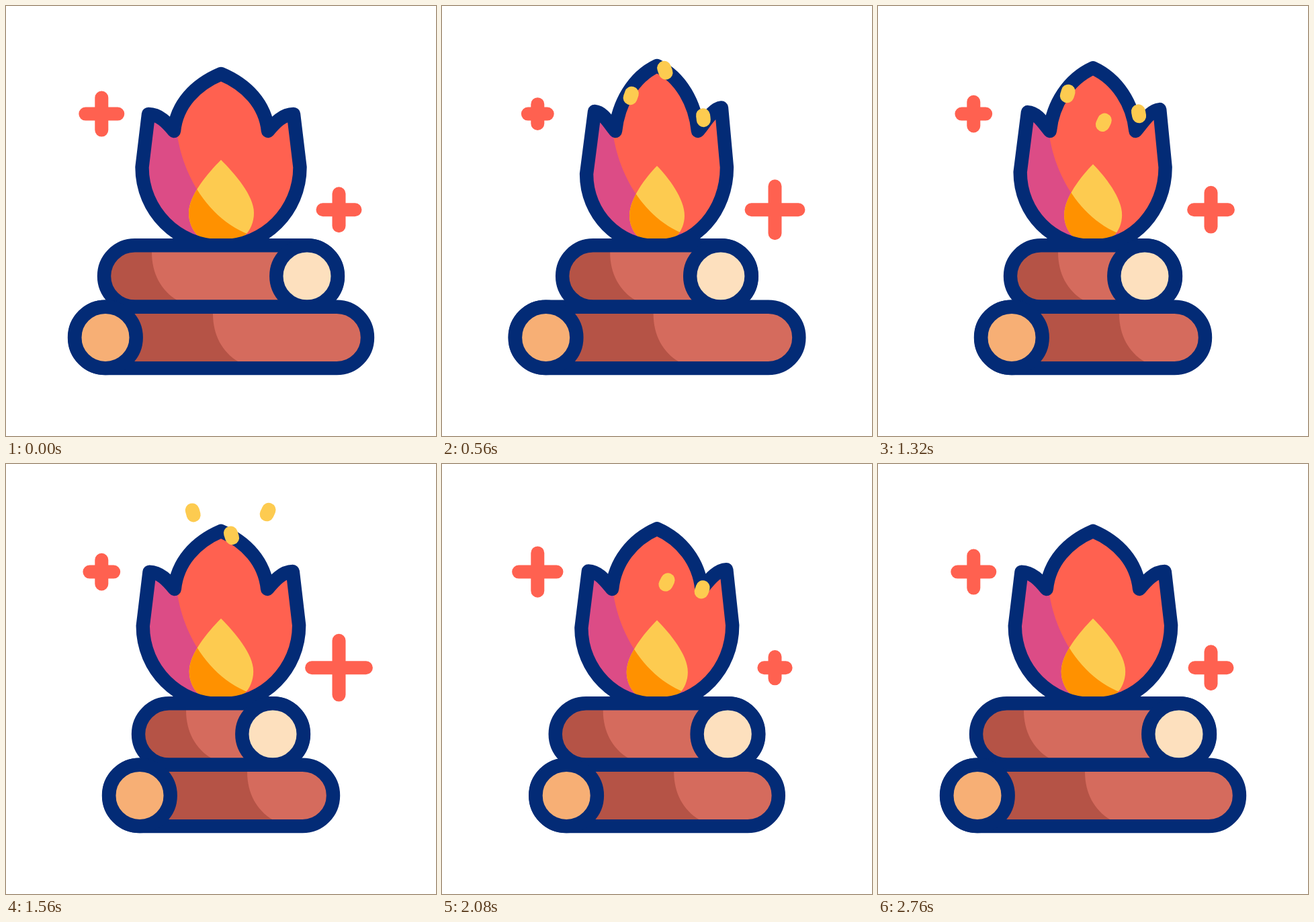
An HTML page with a canvas that plays this animation: 640x640 px, repeating every 2.8 s.

```html
<!DOCTYPE html>
<html lang="en">
<head>
<meta charset="utf-8">
<title>Campfire</title>
<style>
html, body { margin: 0; width: 100%; height: 100%; overflow: hidden; background: #fff; }
canvas { display: block; width: 640px; height: 640px; }
</style>
</head>
<body>
<canvas id="stage" width="640" height="640"></canvas>
<script>
const ctx = document.getElementById('stage').getContext('2d');
const LOOP = 2800;
const NAVY = '#032b76', RED = '#ff6150', YELLOW = '#fdcb50';

const clamp = x => Math.min(1, Math.max(0, x));
const mix = (a, b, k) => a + (b - a) * k;
const sine = p => (1 - Math.cos(Math.PI * clamp(p))) / 2;
const progress = (t, start, end) => sine((t - start) / (end - start));

// Cubic easing with horizontal tangents at both ends
function bezierEase(p, x1, x2) {
  let lo = 0, hi = 1;
  for (let i = 0; i < 20; i++) {
    const s = (lo + hi) / 2, r = 1 - s;
    if (3 * s * r * r * x1 + 3 * s * s * r * x2 + s ** 3 < p) lo = s; else hi = s;
  }
  return lo * lo * (3 - 2 * lo);
}

// Eased track through equally spaced values
function track(t, start, step, values) {
  const p = Math.min(values.length - 1.001, Math.max(0, (t - start) / step));
  const i = Math.floor(p);
  return mix(values[i], values[i + 1], sine(p - i));
}

// Blends two path strings of the same structure
function morph(from, to, k) {
  const target = to.match(/[\d.]+/g);
  let i = 0;
  return new Path2D(from.replace(/[\d.]+/g, n => mix(+n, +target[i++], k)));
}

function fill(path, color) {
  ctx.fillStyle = color;
  ctx.fill(path);
}

function stroke(path, color, width = 20.4) {
  ctx.strokeStyle = color;
  ctx.lineWidth = width;
  ctx.stroke(path);
}

const FLAME_WIDE = 'M320 101C282 117 254 146 250 186C240 174 228 161 212 161L202.5 240' +
  'C202.5 305 255 357.5 320 357.5C385 357.5 437.5 305 437.5 240L428 161' +
  'C412 161 400 174 390 186C386 146 358 117 320 101Z';
const FLAME_TALL = 'M320 89C284 106 262 146 258 186C248 174 240 158 227 157L215 250' +
  'C215 310 262 357.5 320 357.5C378 357.5 424 305 424 240L416 151.5' +
  'C402 153 391 175 381 186C377 146 356 106 320 89Z';
const CORE_WIDE = 'M320 229C300 249 272 282 272 308C272 335 293 356.5 320.5 356.5' +
  'C348 356.5 369 335 369 308C369 282 340 249 320 229Z';
const CORE_TALL = 'M320 238C303 255 279 287 279 312C279 336 297 355 320 355' +
  'C343 355 361 336 361 312C361 287 337 255 320 238Z';
const SHADE = new Path2D('M252 150C250 235 295 315 362 340V380H180V150Z');

function drawFlame(t) {
  const k = (1 - Math.cos(t * Math.PI / 200)) / 2 / 0.905;
  const flame = morph(FLAME_WIDE, FLAME_TALL, k);
  const core = morph(CORE_WIDE, CORE_TALL, k);
  fill(flame, RED);
  ctx.save();
  ctx.clip(flame);
  fill(SHADE, '#dc4c86');
  fill(core, YELLOW);
  ctx.clip(core);
  fill(SHADE, '#ff9100');
  ctx.restore();
  stroke(flame, NAVY);
}

function drawLog(half, cy, edge, capSide, capColor) {
  const r = 45.7, left = 320 - half, top = cy - r, bottom = cy + r;
  const body = new Path2D();
  body.roundRect(left + 10, top, 2 * half - 20, 2 * r, r);
  fill(body, '#d56b5d');
  const x = left + edge;
  fill(new Path2D(`M${x} ${top}V${cy - 35}C${x} ${cy - 4} ${x + 14} ${cy + 22} ${x + 38} ${cy + 36}` +
    `V${bottom}H${left + 56}A${r} ${r} 0 0 1 ${left + 56} ${top}Z`), '#b55346');
  stroke(body, NAVY);
  const cap = new Path2D();
  cap.arc(320 + capSide * (half - 56), cy, r, 0, 7);
  fill(cap, capColor);
  stroke(cap, NAVY);
}

function drawPlus(x, y, half) {
  const a = half - 10;
  stroke(new Path2D(`M${x - a} ${y}h${2 * a}M${x} ${y - a}v${2 * a}`), RED, 20);
}

const SPARKS = [
  { path: 'M268 185C270 160 276 148 281.5 133S285 95 277 68', length: 122, life: 640, starts: [266, 1015, 2095] },
  { path: 'M321 196C353 158 343 128 333 99S322 72 322 58', length: 150, life: 772, starts: [66, 1105, 1878] },
  { path: 'M386 190C400 160 366 122 381 90S390 72 391 62', length: 142, life: 530, starts: [417, 1159, 2031] }
].map(s => ({ ...s, path: new Path2D(s.path) }));

function drawSparks(t) {
  for (const { path, length, life, starts } of SPARKS) {
    for (const start of starts) {
      const p = (t - start) / life;
      if (p <= 0 || p >= 1) continue;
      ctx.setLineDash([7, 999]);
      ctx.lineDashOffset = 3.5 - length * sine(p);
      stroke(path, YELLOW, 21 * clamp(Math.min(p, 1 - p) * 12));
    }
  }
  ctx.setLineDash([]);
}

function draw(t) {
  ctx.fillStyle = '#fff';
  ctx.fillRect(0, 0, 640, 640);
  ctx.lineCap = ctx.lineJoin = 'round';

  const upper = 184 - 51 * (progress(t, 0, 940) - progress(t, 1605, 2495));
  const lower = 228 - 51 * (progress(t, 400, 1085) - bezierEase(clamp((t - 1600) / 1160), 0.36, 0.93));

  drawFlame(t);
  drawLog(upper, 402, 81, 1, '#fde0be');
  drawLog(lower, 493.4, 216, -1, '#f7af75');
  drawPlus(142.3, 160.6, track(t, 205, 412, [34, 24, 44, 24, 44, 34]));
  drawPlus(495.5, 303.2, track(t, 312, 411, [34, 50.5, 24, 50.5, 24, 34]));
  drawSparks(t);
}

const origin = performance.now();
function tick() {
  draw((performance.now() - origin) % LOOP);
  requestAnimationFrame(tick);
}
tick();
</script>
</body>
</html>
```
